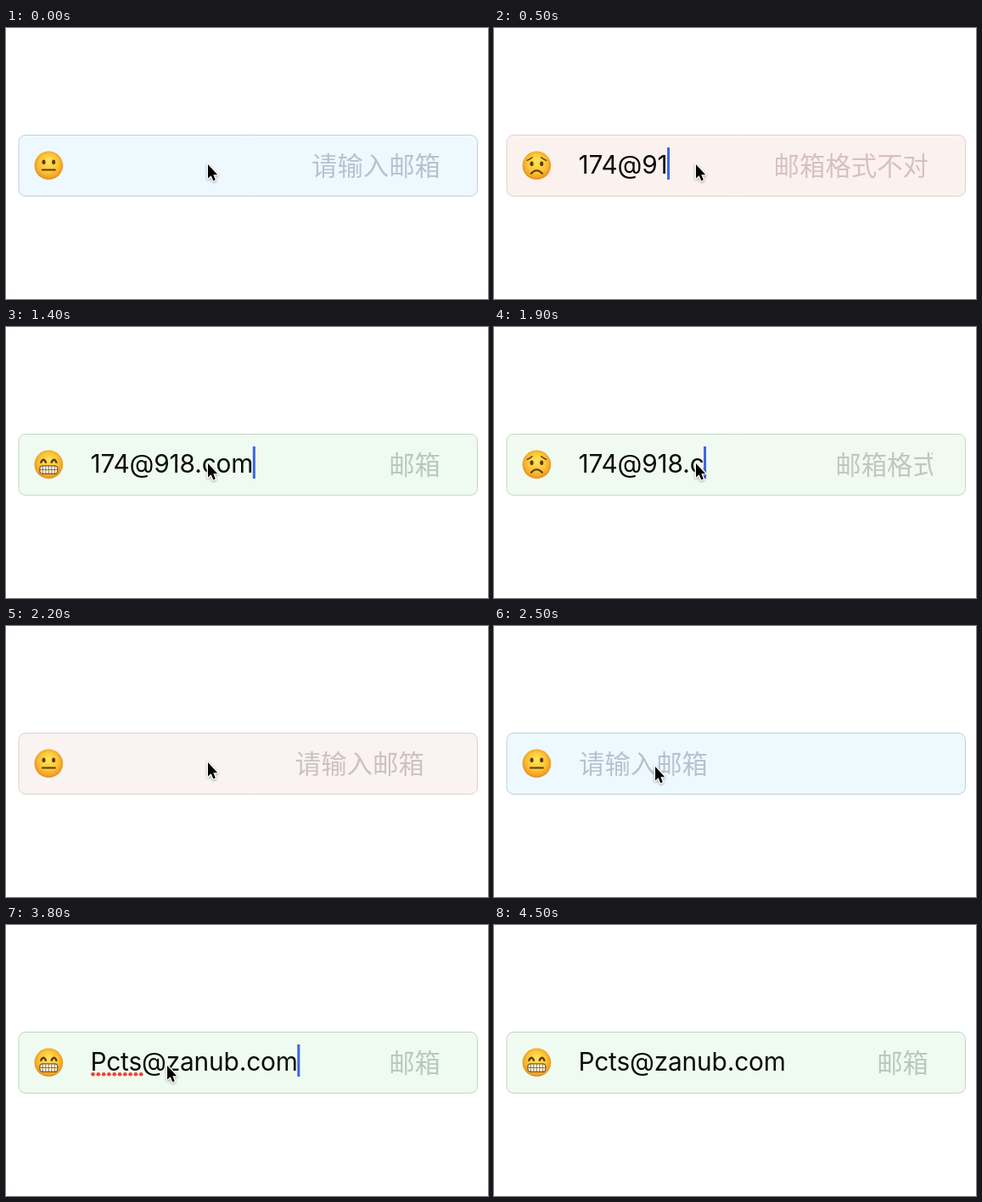
Recreate the animation shown at these times as an HTML page with a canvas. Size 568 by 320 pixels, loop 4.6 s.

```html
<!DOCTYPE html>
<html lang="zh">
<head>
<meta charset="utf-8">
<title>邮箱输入框</title>
<style>
  html, body { margin: 0; width: 100%; height: 100%; overflow: hidden; background: #fff; }
  canvas { display: block; width: 568px; height: 320px; }
</style>
</head>
<body>
<canvas id="stage"></canvas>
<script>
const W = 568, H = 320, LOOP = 4600, STEP = 100, FADE = 200;
const canvas = document.getElementById('stage');
const ratio = window.devicePixelRatio || 1;
canvas.width = W * ratio;
canvas.height = H * ratio;
const ctx = canvas.getContext('2d');

const TEXT_FONT = '29.8px Inter, sans-serif';
const TEXT_SPACING = '-0.12px';
const LABEL_SIZE = 30.4;
const LABEL_FONT = LABEL_SIZE + 'px "Noto Sans CJK SC", "Noto Sans CJK", sans-serif';
const TEXT_X = 99.4, BASE = 172, CLIP_BOTTOM = 218;
const FIRST = '174@918.com', SECOND = 'Pcts@zanub.com';

const MODES = {
  idle: { label: '请输入邮箱', fill: [238, 249, 255], line: [190, 206, 224], ink: [182, 194, 207] },
  bad:  { label: '邮箱格式不对', fill: [251, 242, 239], line: [227, 205, 205], ink: [215, 192, 192] },
  good: { label: '邮箱', fill: [239, 251, 240], line: [192, 214, 196], ink: [182, 202, 186] }
};

// start time, mode, label at the left
const CHANGES = [
  [-FADE, 'idle', false], [100, 'bad', false], [730, 'good', false],
  [1845, 'bad', false], [2150, 'idle', false], [2280, 'idle', true],
  [2600, 'idle', false], [2690, 'bad', false], [3600, 'good', false]
];

// time, number of typed characters
const TYPED = [
  [0, 0], [30, 0], [730, 10], [1100, 11], [1599, 11], [1600, 10], [1844, 10],
  [1845, 9], [1950, 9], [2150, 0], [2635, 0], [3075, 8], [3100, 8],
  [3600, 13], [3700, 14]
];

// time, x, y of the pointer tip
const POINTER = [[0, 238, 161], [2200, 238, 161], [2400, 190, 166], [3850, 190, 166], [4200, 190, 226]];

const clamp = v => Math.max(0, Math.min(1, v));
const mix = (a, b, p) => a + (b - a) * p;
const mixAll = (a, b, p) => a.map((v, i) => mix(v, b[i], p));
const rgb = c => `rgb(${c.map(Math.round).join()})`;
const easeInOut = p => p * p * (3 - 2 * p) * (0.6 + 0.4 * p);
const easeOut = p => 1 - Math.pow(1 - p, 1.6);

function track(keys, t) {
  const i = keys.findIndex(k => k[0] > t);
  if (i < 0) return keys[keys.length - 1].slice(1);
  const a = keys[i - 1], b = keys[i];
  return mixAll(a, b, (t - a[0]) / (b[0] - a[0])).slice(1);
}

const labelX = (mode, left) => left ? 100 : 512 - LABEL_SIZE * MODES[mode].label.length;

function fieldAt(t) {
  const s = { ...MODES.idle, mode: 'idle', x: labelX('idle', false) };
  CHANGES.forEach(([start, mode, left], i) => {
    if (start > t) return;
    const next = CHANGES[i + 1];
    const p = clamp((Math.min(t, next ? next[0] : t) - start) / FADE);
    const goal = MODES[mode];
    s.mode = mode;
    s.label = goal.label;
    s.x = mix(s.x, labelX(mode, left), easeOut(p));
    s.ink = mixAll(s.ink, goal.ink, easeOut(p));
    s.fill = mixAll(s.fill, goal.fill, easeInOut(p));
    s.line = mixAll(s.line, goal.line, easeInOut(p));
  });
  return s;
}

function write(text, x, y, font, color, spacing) {
  ctx.font = font;
  ctx.letterSpacing = spacing || '0px';
  ctx.fillStyle = color;
  ctx.fillText(text, x, y);
}

function widthOf(text) {
  ctx.font = TEXT_FONT;
  ctx.letterSpacing = TEXT_SPACING;
  return ctx.measureText(text).width;
}

function box(x, y, w, h, r) {
  ctx.beginPath();
  ctx.roundRect(x, y, w, h, r);
}

function oval(x, y, rx, ry) {
  ctx.beginPath();
  ctx.ellipse(x, y, rx, ry, 0, 0, Math.PI * 2);
  ctx.fill();
}

function curve(x1, y1, cx, cy, x2, y2, width) {
  ctx.lineWidth = width;
  ctx.beginPath();
  ctx.moveTo(x1, y1);
  ctx.quadraticCurveTo(cx, cy, x2, y2);
  ctx.stroke();
}

function drawField(s) {
  box(15, 126.5, 540.5, 72, 8);
  ctx.fillStyle = rgb(s.fill);
  ctx.fill();
  ctx.strokeStyle = rgb(s.line);
  ctx.lineWidth = 1;
  ctx.stroke();
  ctx.save();
  ctx.beginPath();
  ctx.rect(80, 130, 437, 66);
  ctx.clip();
  write(s.label, s.x, 173.5, LABEL_FONT, rgb(s.ink));
  ctx.restore();
}

function drawFace(mode) {
  ctx.save();
  ctx.translate(50.3, 162.3);
  const skin = ctx.createRadialGradient(0, -5, 2, 0, -1, 18);
  skin.addColorStop(0, '#ffdf55');
  skin.addColorStop(0.55, '#fcc637');
  skin.addColorStop(0.85, '#f2a426');
  skin.addColorStop(1, '#d98a24');
  ctx.fillStyle = skin;
  oval(0, 0, 16.8, 16.8);
  ctx.fillStyle = ctx.strokeStyle = '#5d3a0c';
  ctx.lineCap = 'round';
  if (mode === 'good') {
    curve(-9, -2.5, -6.2, -8.5, -3.4, -2.5, 2.4);
    curve(3.4, -2.5, 6.2, -8.5, 9, -2.5, 2.4);
    box(-10.5, 1.5, 21, 9.5, 3.5);
    ctx.fillStyle = '#fbf6e8';
    ctx.fill();
    ctx.lineWidth = 1.3;
    ctx.strokeStyle = '#80591f';
    ctx.stroke();
    ctx.lineWidth = 0.8;
    ctx.beginPath();
    for (let x = -7; x <= 7; x += 3.5) {
      ctx.moveTo(x, 2);
      ctx.lineTo(x, 10.5);
    }
    ctx.moveTo(-10, 6.2);
    ctx.lineTo(10, 6.2);
    ctx.stroke();
  } else {
    const eyeY = mode === 'bad' ? -2 : -4;
    oval(-5.8, eyeY, 2, 2.8);
    oval(5.8, eyeY, 2, 2.8);
    if (mode === 'bad') {
      curve(-11, -6, -8, -7, -5.5, -9.5, 1.6);
      curve(11, -6, 8, -7, 5.5, -9.5, 1.6);
      curve(-6.5, 9.5, 0, 2.5, 6.5, 9.5, 2.1);
    } else {
      curve(-7.5, 5.3, 0, 5.3, 7.5, 5.3, 2);
    }
  }
  ctx.restore();
}

function drawSelection(x, end) {
  ctx.fillStyle = '#cfd3e6';
  ctx.fillRect(x, 137, end - x + 3, 44);
}

function drawSuggestion(x) {
  box(x + 0.5, 181, 88, 48, [2, 24, 24, 2]);
  ctx.fillStyle = '#fff';
  ctx.fill();
  ctx.strokeStyle = '#b5b5ba';
  ctx.lineWidth = 1;
  ctx.stroke();
  write('tan', x + 5, 214.5, TEXT_FONT, '#1f66cc', TEXT_SPACING);
  ctx.strokeStyle = '#b2b2b2';
  ctx.lineWidth = 2;
  ctx.beginPath();
  for (const d of [-6, 6]) {
    ctx.moveTo(x + 64.5 - 6, 204.5 - d);
    ctx.lineTo(x + 64.5 + 6, 204.5 + d);
  }
  ctx.stroke();
}

function drawUnderline(end) {
  ctx.fillStyle = '#ee4339';
  for (let x = 102.5; x < end; x += 6.3) oval(x, 176.3, 2.4, 2.3);
}

function drawPointer(x, y) {
  ctx.save();
  ctx.translate(x, y);
  const arrow = new Path2D('M0 0V16.6L3.7 13.2L6.3 19.4L8.8 18.3L6.3 12.2H11.2Z');
  ctx.lineJoin = 'round';
  ctx.shadowColor = 'rgba(0,0,0,0.35)';
  ctx.shadowBlur = 3 * ratio;
  ctx.shadowOffsetY = ratio;
  ctx.strokeStyle = '#fff';
  ctx.lineWidth = 2.6;
  ctx.stroke(arrow);
  ctx.shadowColor = 'transparent';
  ctx.fillStyle = '#000';
  ctx.fill(arrow);
  ctx.restore();
}

function draw(t) {
  ctx.setTransform(ratio, 0, 0, ratio, 0, 0);
  ctx.fillStyle = '#fff';
  ctx.fillRect(0, 0, W, H);
  ctx.save();
  ctx.beginPath();
  ctx.rect(0, 0, W, CLIP_BOTTOM);
  ctx.clip();

  const field = fieldAt(t);
  const mail = t < 2400 ? FIRST : SECOND;
  const text = mail.slice(0, Math.floor(track(TYPED, t)[0] + 1e-6));
  const end = TEXT_X + widthOf(text);
  const domainX = TEXT_X + widthOf(SECOND.slice(0, 5));
  const suggesting = t >= 3000 && t < 3200;

  drawField(field);
  drawFace(field.mode);
  if (suggesting) drawSelection(domainX, end);
  write(text, TEXT_X, BASE, TEXT_FONT, '#0b0b0b', TEXT_SPACING);
  if (t >= 2900 && t < 4500) drawUnderline(TEXT_X + widthOf(SECOND.slice(0, 4)));
  if (text && t < 4200) {
    ctx.fillStyle = '#3c64e6';
    ctx.fillRect(end - 0.5, 141, 3, 38);
  }
  if (suggesting) drawSuggestion(domainX);
  if (t < 4500) drawPointer(...track(POINTER, t));
  ctx.restore();
}

const begin = performance.now();
function tick() {
  const t = (performance.now() - begin) % LOOP;
  draw(Math.floor(t / STEP) * STEP);
  requestAnimationFrame(tick);
}
tick();
</script>
</body>
</html>
```
